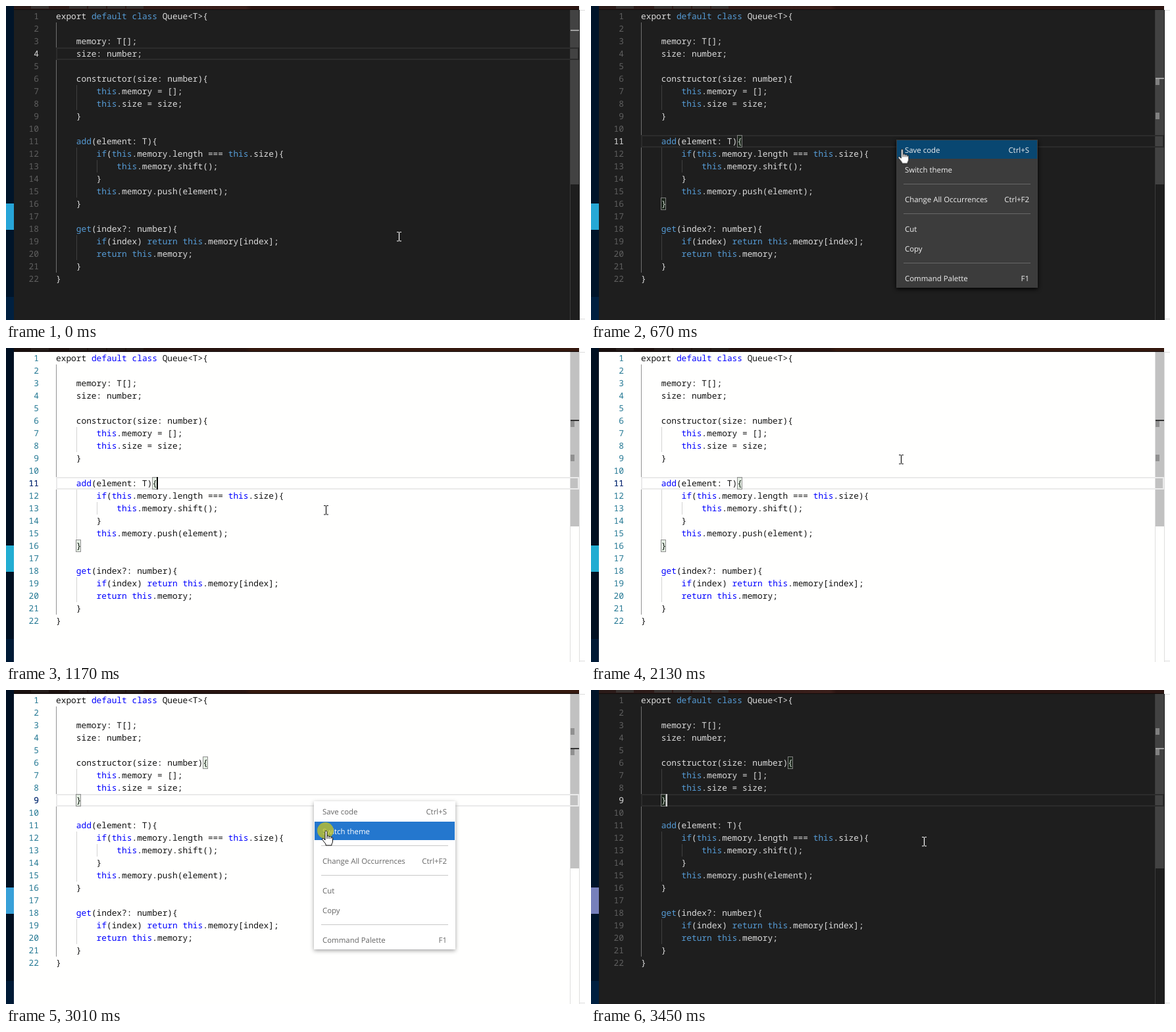
An HTML page that plays this animation: 880x477 px, repeating every 3.53 s.

```html
<!DOCTYPE html>
<html lang="en">
<head>
<meta charset="utf-8">
<title>Editor theme switch</title>
<style>
html, body { margin: 0; width: 100%; height: 100%; overflow: hidden; background: #fff; }
svg { display: block; width: 880px; height: 477px; }
svg, svg * { animation-duration: 3530ms; animation-timing-function: step-end; animation-iteration-count: infinite; }
text { text-rendering: geometricPrecision; }

#stage { animation-name: theme; }
@keyframes theme {
  0%, 87.535% {
    --bg: #1e1e1e; --fg: #dcdcdc; --key: #569cd6; --num: #5f5f5f; --active-num: #d0d0d0;
    --line: #2c2c2c; --guide: #404040; --main-guide: #707070; --rule: #3a3a3a; --slider: #424242;
    --mark: #a0a0a0; --match: #808080; --caret: #d0d0d0; --beam: #fff; --edge: #1e1e1e;
    --menu: #3c3c3c; --menu-text: #f0f0f0; --menu-rule: #686868; --hover: #094771; --shadow: #000;
    --navy: #001429; --navy-low: #002040; --bar-a: #2a1a18; --bar-b: #3a1e1a; --bar-c: #2b1512; --tab: #383230;
  }
  33.144% {
    --bg: #fffffe; --fg: #111; --key: #0000ff; --num: #237893; --active-num: #0b216f;
    --line: #eaeaea; --guide: #d3d3d3; --main-guide: #939393; --rule: #dedede; --slider: #c1c1c1;
    --mark: #333; --match: #909090; --caret: #000; --beam: #111; --edge: #dedede;
    --menu: #fff; --menu-text: #666; --menu-rule: #c8c8c8; --hover: #2477ce; --shadow: #a0a0a0;
    --navy: #001022; --navy-low: #001a36; --bar-a: #180f0e; --bar-b: #2a1511; --bar-c: #35190f; --tab: #241c1a;
  }
}

.code, .num { font: 12.83px "Noto Sans Mono", monospace; }
.code { fill: var(--fg); }
.key { fill: var(--key); }
.num { fill: var(--num); text-anchor: end; }
.num.active { fill: var(--active-num); }
.band { fill: none; stroke: var(--line); stroke-width: 2; }
.match { fill: rgba(0, 100, 0, .1); stroke: var(--match); }
.mark { fill: var(--mark); }
.match-mark { fill: var(--match); }
.caret { fill: var(--caret); }

#at4 { animation-name: at4; }
#at9 { animation-name: at9; }
#at11 { animation-name: at11; }
#at9 .pair { animation-name: pair9; }
#at11 .pair { animation-name: pair11; }
#at9 .caret { animation-name: caret9; }
#at11 .caret { animation-name: caret11; }
@keyframes at4 { 0% { visibility: visible } 12.748%, 100% { visibility: hidden } }
@keyframes at11 { 0%, 62.04%, 100% { visibility: hidden } 12.748% { visibility: visible } }
@keyframes at9 { 0% { visibility: hidden } 62.04%, 100% { visibility: visible } }
@keyframes pair11 { 0%, 62.04%, 100% { visibility: hidden } 14.448% { visibility: visible } }
@keyframes pair9 { 0% { visibility: hidden } 63.739%, 100% { visibility: visible } }
@keyframes caret11 { 0%, 47.309%, 100% { visibility: hidden } 33.144% { visibility: visible } }
@keyframes caret9 { 0% { visibility: hidden } 87.535%, 100% { visibility: visible } }

#menu { font: 11.43px "Open Sans", sans-serif; fill: var(--menu-text); animation-name: menu; }
#menu .panel { fill: var(--menu); filter: drop-shadow(0 2px 3px var(--shadow)); }
#menu .hover { fill: var(--hover); animation-name: hover; }
#menu .keys { text-anchor: end; }
#menu .row0 { animation-name: row0; }
#menu .row1 { animation-name: row1; }
@keyframes menu {
  0%, 33.144% { visibility: hidden; transform: translate(464px, 203px) }
  14.448% { visibility: visible; transform: translate(464px, 203px) }
  63.739% { visibility: visible; transform: translate(468px, 169px) }
  87.535%, 100% { visibility: hidden; transform: translate(468px, 169px) }
}
@keyframes hover {
  0%, 33.144% { opacity: 0; transform: none }
  16.147%, 66.006% { opacity: 1; transform: none }
  24.5%, 70.5%, 100% { opacity: 1; transform: translateY(30px) }
}
@keyframes row0 { 0%, 70.5%, 100% { fill: var(--menu-text) } 66.006% { fill: #fff } }
@keyframes row1 { 0%, 87.535%, 100% { fill: var(--menu-text) } 70.5% { fill: #fff } }

#pointer { animation-name: move; }
#beam { fill: none; stroke: var(--beam); animation-name: beam; }
#hand { fill: #fff; stroke: #111; stroke-linejoin: round; animation-name: hand; }
#click { fill: rgba(200, 196, 30, .75); animation-name: click; }
@keyframes move {
  0% { transform: translate(597px, 350px) }
  .85% { transform: translate(597px, 350px); animation-timing-function: steps(4, start) }
  8.782% { transform: translate(467px, 203px) }
  16.147% { transform: translate(467px, 203px); animation-timing-function: steps(6, start) }
  28.612% { transform: translate(486px, 246px) }
  45.609% { transform: translate(486px, 246px); animation-timing-function: steps(5, start) }
  56.232% { transform: translate(471px, 169px) }
  66.006% { transform: translate(471px, 169px); animation-timing-function: steps(4, start) }
  75.071% { transform: translate(487px, 214px) }
  89.235% { transform: translate(487px, 214px); animation-timing-function: steps(5, start) }
  99.858%, 100% { transform: translate(506px, 230px) }
}
@keyframes hand { 0%, 33.144%, 87.535%, 100% { opacity: 0 } 14.448%, 63.739% { opacity: 1 } }
@keyframes beam { 0%, 33.144%, 87.535%, 100% { opacity: 1 } 14.448%, 63.739% { opacity: 0 } }
@keyframes click {
  0%, 12.748%, 33.144%, 60.34%, 87.535%, 100% { opacity: 0 }
  8.782%, 28.612%, 58.074%, 85.269% { opacity: 1 }
}

#accent { animation-name: accent; animation-timing-function: linear; }
@keyframes accent {
  0%, 13% { fill: #27a5d8 }
  31%, 62% { fill: #23add2 }
  85.269% { fill: #38a0d8 }
  97.734%, 100% { fill: #7780bb }
}
</style>
</head>
<body>
<svg id="stage" viewBox="0 0 880 477">
  <defs>
    <linearGradient id="bar">
      <stop offset="0" style="stop-color:var(--bar-a)"/>
      <stop offset=".41" style="stop-color:var(--bar-b)"/>
      <stop offset=".42" style="stop-color:var(--bar-c)"/>
      <stop offset="1" style="stop-color:var(--bar-c)"/>
    </linearGradient>
  </defs>
  <rect width="880" height="477" fill="#fff"/>
  <rect width="12" height="442" fill="var(--navy)"/>
  <rect y="442" width="12" height="35" fill="var(--navy-low)"/>
  <rect id="accent" y="300" width="12" height="40"/>
  <rect x="12" width="859" height="6" fill="url(#bar)"/>
  <path d="M38 0h27v4h-27zM96 0h27v4h-27zM125 0h27v4h-27zM154 0h27v4h-27zM183 0h26v4h-26z" fill="var(--tab)"/>
  <path d="M12 5.5H871" stroke="#120c0b"/>
  <path d="M872 6.5H880M872 475.5H880" stroke="#ddd"/>
  <rect x="12" y="6" width="859" height="471" fill="var(--bg)"/>
  <path d="M871.5 6V477" stroke="var(--edge)"/>
  <rect x="858" y="6" width="13" height="265" fill="var(--slider)"/>
  <path d="M857.5 6V477" stroke="var(--rule)"/>
  <g id="focus"></g>
  <path d="M107.5 120V158M107.5 215V291M107.5 348V386M138.5 234V253" stroke="var(--guide)"/>
  <path d="M76.5 25V405" stroke="var(--main-guide)"/>
  <g id="code"></g>
  <g id="carets"></g>
  <g id="menu"></g>
  <g id="pointer">
    <circle id="click" cx="-1.5" cy="-.5" r="12.5"/>
    <path id="beam" d="M-3-6.5H0M1-6.5H4M.5-6V6.5M-3 7H0M1 7H4" stroke-width="1.2"/>
    <path id="hand" d="M-2 1.5Q-2 0-.5 0T1 1.5V8Q3 7 4 8.5Q6 7.8 7 9.5Q9.5 9 9.5 11V16Q9.5 18 8 20V22H-1V20Q-3 17.5-6.5 13Q-6.5 10.5-4.5 11.5L-2 14Z M1 8V12M4 9V12M7 10V12"/>
  </g>
</svg>
<script>
const source = `export default class Queue<T>{

    memory: T[];
    size: number;

    constructor(size: number){
        this.memory = [];
        this.size = size;
    }

    add(element: T){
        if(this.memory.length === this.size){
            this.memory.shift();
        }
        this.memory.push(element);
    }

    get(index?: number){
        if(index) return this.memory[index];
        return this.memory;
    }
}`;
const charWidth = 7.697;
const lineTop = n => 6 + 19 * (n - 1);
const columnX = c => 76 + charWidth * c;
const fill = (id, html) => { document.getElementById(id).innerHTML = html; };
const number = (n, cls = '') => `<text class="num ${cls}" x="50" y="${lineTop(n) + 14}">${n}</text>`;

function codeLine(line, i) {
  const body = line.trimStart();
  const html = body.replace(/</g, '&lt;').replace(/>/g, '&gt;')
    .replace(/\b(default|class|this|if|add|get|return)\b/g, '<tspan class="key">$1</tspan>');
  const x = columnX(line.length - body.length);
  return number(i + 1) + `<text class="code" x="${x}" y="${lineTop(i + 1) + 14}">${html}</text>`;
}

// Overview ruler position of a code line.
const rulerY = n => Math.round(6 + 10.4 * (n - 1));

function bracket([line, column]) {
  const x = Math.floor(columnX(column)) + .5;
  return `<rect class="match" x="${x}" y="${lineTop(line) + .5}" width="7" height="18"/>
    <rect class="match-mark" x="858" y="${rulerY(line)}" width="6" height="10"/>`;
}

function focusLine(n, brackets = [], caretColumn) {
  const caret = caretColumn
    ? `<rect class="caret" x="${Math.floor(columnX(caretColumn))}" y="${lineTop(n)}" width="2" height="19"/>` : '';
  return `<g id="at${n}">
    <rect class="band" x="77" y="${lineTop(n) + 1}" width="793" height="17"/>
    ${number(n, 'active')}
    <g class="pair">${brackets.map(bracket).join('')}</g>
    <rect class="mark" x="858" y="${rulerY(n) - 1}" width="13" height="2"/>
    ${caret}</g>`;
}

fill('code', source.split('\n').map(codeLine).join(''));
fill('focus', focusLine(4)
  + focusLine(11, [[11, 19], [16, 4]], 20)
  + focusLine(9, [[6, 29], [9, 4]], 5));
// Active numbers and carets sit above the plain text.
document.getElementById('code').after(document.getElementById('focus'));

const items = [
  ['Save code', 'Ctrl+S', 20], ['Switch theme', '', 50], ['Change All Occurrences', 'Ctrl+F2', 95],
  ['Cut', '', 140], ['Copy', '', 170], ['Command Palette', 'F1', 215]
];
fill('menu', `<rect class="panel" width="215" height="225"/>
  <rect class="hover" x="1" y="1" width="213" height="28"/>
  <path d="M11 67.5H204M11 112.5H204M11 187.5H204" stroke="var(--menu-rule)"/>`
  + items.map(([label, keys, y], i) => `<g class="row${i}"><text x="13" y="${y}">${label}</text>
    <text class="keys" x="202" y="${y}">${keys}</text></g>`).join(''));
</script>
</body>
</html>
```
